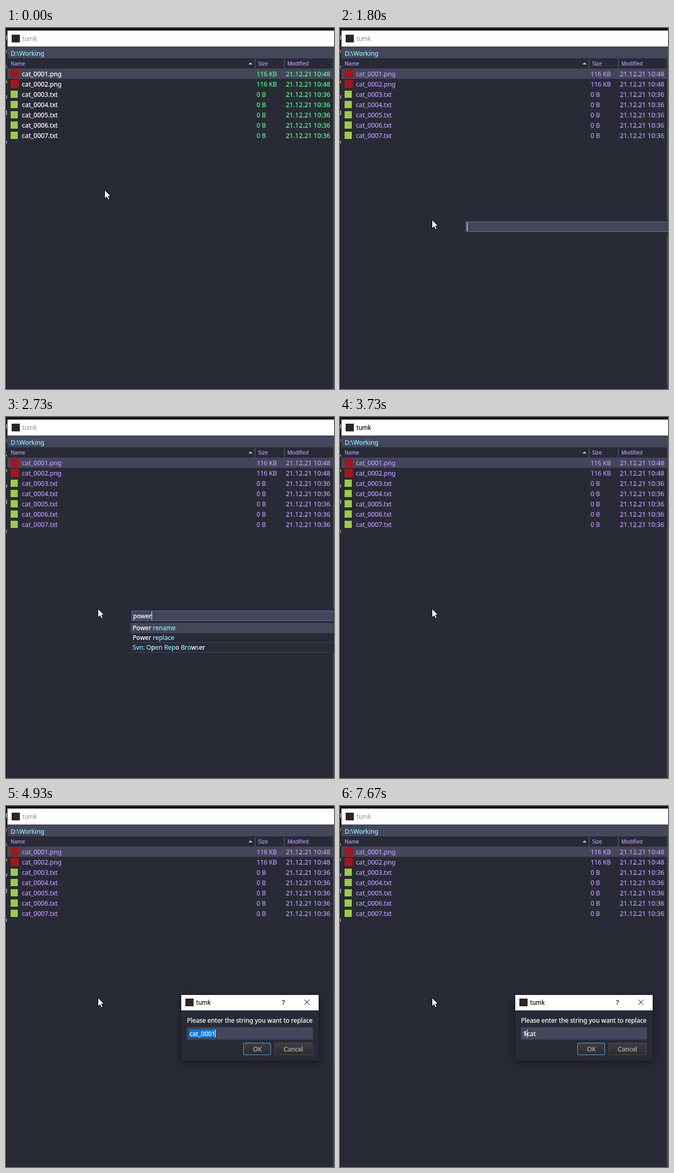
These frames come from a looping animation (640x703 px, 8000 ms). An HTML page with a canvas:

```html
<!DOCTYPE html>
<html lang="en">
<head>
<meta charset="utf-8">
<title>File manager</title>
<style>
html, body { margin: 0; width: 640px; height: 703px; overflow: hidden; background: #282a36; }
canvas { display: block; }
</style>
</head>
<body>
<canvas id="stage" width="640" height="703"></canvas>
<script>
const ctx = document.getElementById('stage').getContext('2d');
const LOOP = 8000;
const BG = '#282a36', LINE = '#44475a', CYAN = '#8be9fd', GREEN = '#50fa7b',
      PURPLE = '#bd93f9', WHITE = '#fff', BLUE = '#6272a4';
const APP = 'tumk';
const UI = 12.2, LIST = 12.4;

const FILES = Array.from({ length: 7 }, (_, i) => {
  const image = i < 2;
  return {
    image,
    name: `cat_000${i + 1}.${image ? 'png' : 'txt'}`,
    size: image ? '116 KB' : '0 B',
    date: `21.12.21 10:${image ? 48 : 36}`
  };
});
const KEYS = Array.from({ length: 9 }, (_, i) => `Ctrl+${i + 1}`).join(', ');
const ALL = ['Pull', 'Pop dir', 'Paste cut', 'About', 'Copy', 'Move', 'Open', 'Pack', 'Quit', 'Rename'];
const P = ['Pull', 'Pop dir', 'Paste cut', 'Pack', 'Open', 'Copy', 'Paste', 'Compare', 'Open with', 'Copy paths'];
const PO = ['Pop dir', 'Power rename', 'Power replace', 'Svn: Open Repo Browser', 'Compare', 'Copy to',
            'Open repo', 'Properties', 'Open folder', 'Open terminal'];
const POWER = ['Power rename', 'Power replace', 'Svn: Open Repo Browser'];

// [start, query, commands, characters highlighted]
const PALETTE = [
  [1800, '', [], 0], [1870, '', ALL, 0],
  [2200, 'p', P.slice(0, 3), 0], [2270, 'p', P, 1], [2330, 'po', PO, 2],
  [2470, 'pow', POWER, 3], [2530, 'powe', POWER, 4], [2730, 'power', POWER, 5]
];
// [start, text, caret index or -1, selected]
const FIELD = [
  [3800, 'cat_0001', 8, true], [4400, 'cat_0001', -1, true], [4930, 'cat_0001', 8, true],
  [5470, 'c', 1], [5730, 'ca', 2], [5870, 'cat', 3], [6530, 'cat', -1],
  [6600, 'cat', 0], [7200, 'cat', -1], [7670, '$cat', 1]
];
const at = (steps, t) => steps.filter(s => s[0] <= t).pop();

function rect(x, y, w, h, color) {
  ctx.fillStyle = color;
  ctx.fillRect(x, y, w, h);
}

// A hairline outline gives the glyphs the weight of hinted screen type.
function text(s, x, y, color, size = UI, family = 'Noto Sans') {
  ctx.font = `${size}px "${family}", "Open Sans", sans-serif`;
  ctx.fillStyle = ctx.strokeStyle = color;
  ctx.lineWidth = .25;
  ctx.fillText(s, x, y);
  ctx.strokeText(s, x, y);
  return ctx.measureText(s).width;
}

function path(points, color) {
  ctx.beginPath();
  points.forEach(([x, y]) => ctx.lineTo(x, y));
  ctx.closePath();
  ctx.fillStyle = color;
  ctx.fill();
}

function title(x, y, active) {
  rect(x, y + 1, 16, 15, '#2d2522');
  text(APP, x + 21, y + 13, active ? '#000' : '#999', 11.7, 'Open Sans');
}

function drawWindow(active, selected) {
  rect(0, 0, 640, 703, BG);
  rect(0, 0, 640, 5, '#141416');
  rect(0, 5, 3, 698, '#1e1e1f');
  ctx.save();
  ctx.beginPath();
  ctx.rect(0, 6, 2, 230);
  ctx.clip();
  [...'geeougia'].forEach((c, i) =>
    text(c, -4, 20 + i * 29.3, i === 3 ? '#e5b93c' : '#bbb', 11));
  ctx.restore();
  rect(2, 5, 1, 698, '#38383b');
  rect(3, 5, 637, 31, '#fff');
  title(11, 12, active);

  rect(3, 36, 637, 23, LINE);
  text('D:\\Working', 9, 54, CYAN, LIST);
  text('Name', 9, 73, PURPLE, 10);
  text('Size', 492, 73, PURPLE, 10.3);
  text('Modified', 549, 73, PURPLE, 10);
  rect(485, 60, 2, 19, LINE);
  rect(542, 60, 2, 19, LINE);
  path([[473, 71], [477, 67], [481, 71]], '#c8c8c8');
  rect(3, 79, 635, 20, LINE);

  FILES.forEach((f, i) => {
    const y = 94 + i * 20;
    if (f.image) rect(9, y - 13, 16, 16, '#a5141c');
    else rect(9, y - 12, 14, 14, '#9ccb4a');
    text(f.name, 31, y, selected ? PURPLE : WHITE, LIST);
    text(f.size, 489, y, selected ? PURPLE : GREEN);
    text(f.date, 546, y, selected ? PURPLE : GREEN, 12.8);
  });
  rect(638, 36, 2, 667, '#4a4a4e');
}

function drawCommand(name, query, x, y) {
  let next = 0;
  for (const c of name) {
    const hit = next < query.length && c.toLowerCase() === query[next];
    if (hit) next++;
    x += text(c, x, y, hit ? WHITE : CYAN);
  }
}

function drawPalette(t) {
  const [, query, commands, marked] = at(PALETTE, t);
  const current = t < 3200 ? 0 : 1;
  rect(243, 373, 397, 30 + commands.length * 19, BG);
  rect(245, 377, 395, 20, BLUE);
  rect(246, 378, 394, 18, LINE);
  const w = text(query, 248, 392, WHITE);
  rect(Math.round(248 + w), 379, 1, 16, WHITE);
  commands.forEach((name, i) => {
    const y = 401 + i * 19;
    if (i === current) rect(243, y, 397, 19, LINE);
    rect(243, y + 19, 397, 1, LINE);
    drawCommand(name, query.slice(0, marked), 247, y + 14);
    if (name === 'Pop dir') text(KEYS, 339, y + 14, WHITE, 11.4);
  });
}

function button(label, x, w, textX, border) {
  const fill = ctx.createLinearGradient(0, 461, 0, 485);
  fill.addColorStop(0, '#3f3f3f');
  fill.addColorStop(1, '#2b2b2b');
  ctx.beginPath();
  ctx.roundRect(x + .5, 461.5, w - 1, 23, 2);
  ctx.fillStyle = fill;
  ctx.fill();
  ctx.strokeStyle = border;
  ctx.lineWidth = 1;
  ctx.stroke();
  text(label, textX, 478, '#b1b1b1');
}

function drawDialog(t) {
  const open = Math.min(1, (t - 3730) / 340);
  const scale = .9 + .1 * open;
  ctx.save();
  ctx.globalAlpha = open;
  ctx.translate(476, 432);
  ctx.scale(scale, scale);
  ctx.translate(-476, -432);

  ctx.shadowColor = 'rgba(0,0,0,.5)';
  ctx.shadowBlur = 14;
  ctx.shadowOffsetY = 3;
  rect(342, 368, 268, 128, BG);
  ctx.shadowColor = 'transparent';
  rect(342, 368, 268, 30, '#fff');
  title(350, 374, true);
  text('?', 538.5, 387, '#000', 13, 'Open Sans');
  ctx.strokeStyle = '#000';
  ctx.lineWidth = 1;
  ctx.beginPath();
  ctx.moveTo(582, 377);
  ctx.lineTo(592, 387);
  ctx.moveTo(592, 377);
  ctx.lineTo(582, 387);
  ctx.stroke();

  text('Please enter the string you want to replace', 353, 422, WHITE);
  rect(353, 431, 246, 24, LINE);
  const [, value, caret, selected] = at(FIELD, t);
  ctx.font = `${UI}px "Noto Sans", "Open Sans", sans-serif`;
  if (selected) rect(358, 435, ctx.measureText(value).width, 16, '#0078d7');
  text(value, 358, 448, WHITE);
  if (caret >= 0) rect(Math.round(358 + ctx.measureText(value.slice(0, caret)).width), 435, 1, 16, WHITE);
  button('OK', 463, 54, 482, '#5aa7e6');
  button('Cancel', 524, 74, 542, '#505050');
  ctx.restore();
}

function drawPointer(t) {
  const p = Math.min(1, t / 600);
  const ease = p * p * (3 - 2 * p);
  const x = Math.round(192 - 13 * ease), y = Math.round(315 + 58 * ease);
  const arrow = [[0, 0], [0, 17], [4, 13.3], [7, 19], [9.5, 18], [7, 12], [12, 12]]
    .map(([dx, dy]) => [x + dx + .5, y + dy + .5]);
  path(arrow, '#fff');
  ctx.strokeStyle = '#000';
  ctx.lineWidth = 1;
  ctx.stroke();
}

function draw(now) {
  const t = now % LOOP;
  drawWindow((t >= 670 && t < 1800) || (t >= 3730 && t < 3800), t >= 1000);
  if (t >= 1800 && t < 3730) drawPalette(t);
  if (t >= 3800) drawDialog(t);
  drawPointer(t);
}

const start = performance.now();
function tick() {
  draw(performance.now() - start);
  requestAnimationFrame(tick);
}
tick();
</script>
</body>
</html>
```
